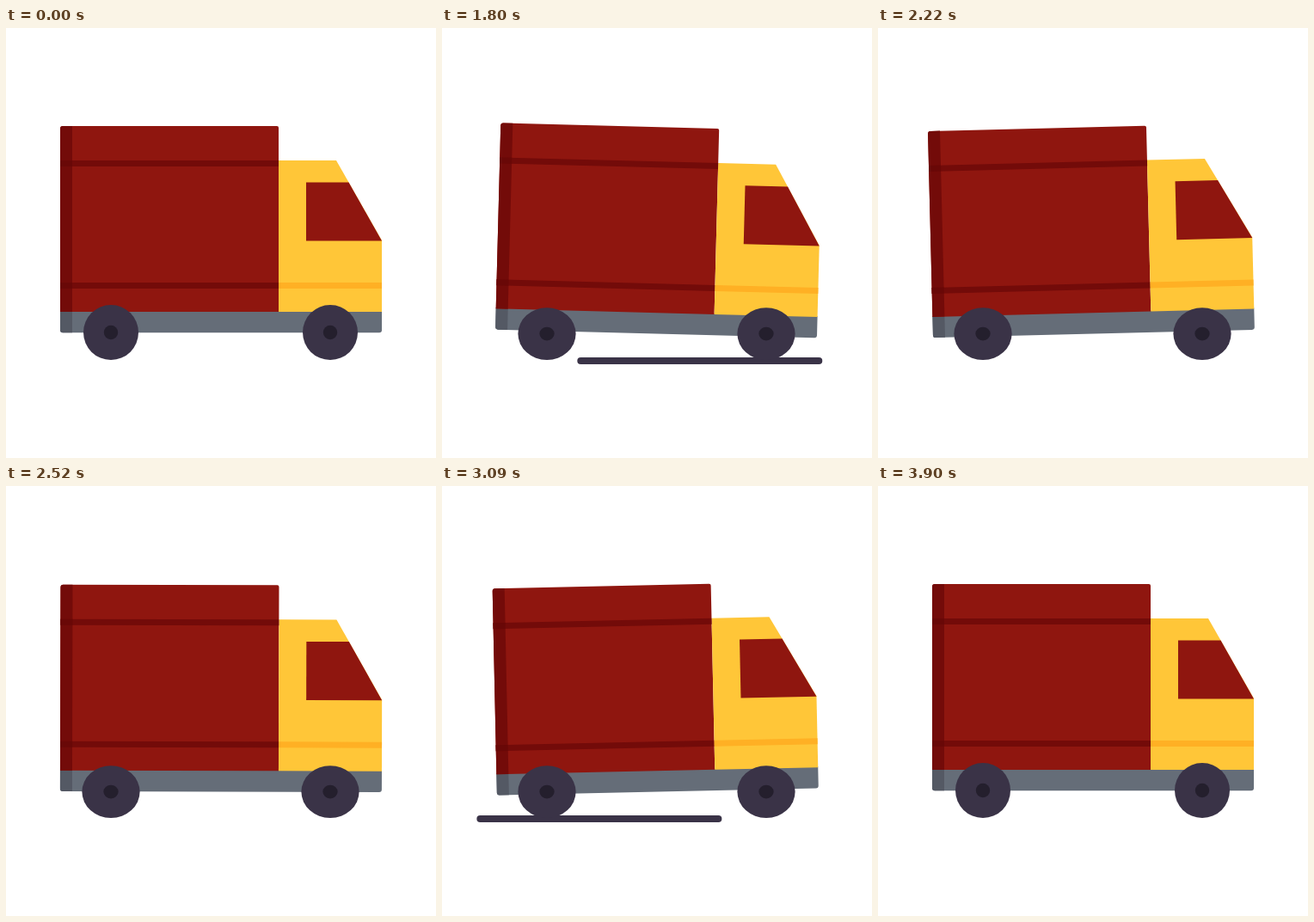
An HTML page with a canvas that plays this animation: 500x500 px, repeating every 3990 ms.

```html
<!DOCTYPE html>
<html lang="en">
<head>
<meta charset="utf-8">
<title>Truck</title>
<style>
  html, body { margin: 0; width: 100%; height: 100%; overflow: hidden; background: #fff; }
  canvas { display: block; width: 100vmin; height: 100vmin; }
</style>
</head>
<body>
<canvas id="stage" width="500" height="500"></canvas>
<script>
const ctx = document.getElementById('stage').getContext('2d');

const LOOP = 3990, STEP = 30;
const DRIVE_START = 1525, DRIVE_END = 3900;
const SWING = (DRIVE_END - DRIVE_START) / 5;
const TILTS = [0, 1, -1, 1, -1, 0];
const MAX_TILT = 1.5 * Math.PI / 180;
const ROAD_START = 1500, ROAD_PERIOD = 1200;

const RED = '#8f160f', DARK_RED = '#730b09', DEEP_RED = '#690807';
const YELLOW = '#ffc638', AMBER = '#ffb024';
const GREY = '#656d78', DARK_GREY = '#545964';
const TYRE = '#3a3347', HUB = '#241f2d';

const easeOut = u => 1 - 2 ** (-12 * u);
const mix = (a, b, u) => a + (b - a) * u;

function rect(x, y, w, h, color) {
  ctx.fillStyle = color;
  ctx.fillRect(x, y, w, h);
}

function rounded(x, y, w, h, radii, color) {
  ctx.fillStyle = color;
  ctx.beginPath();
  ctx.roundRect(x, y, w, h, radii);
  ctx.fill();
}

function polygon(points, color) {
  ctx.fillStyle = color;
  ctx.beginPath();
  points.forEach(([x, y]) => ctx.lineTo(x, y));
  ctx.fill();
}

function disc(r, color) {
  ctx.fillStyle = color;
  ctx.beginPath();
  ctx.arc(0, -32, r, 0, Math.PI * 2);
  ctx.fill();
}

// Tilt swings between extremes; squash holds until the last swing.
function pose(t) {
  if (t < DRIVE_START || t >= DRIVE_END) return { tilt: 0, squash: 0 };
  const phase = (t - DRIVE_START) / SWING;
  const i = Math.floor(phase);
  const u = easeOut(phase - i);
  return {
    tilt: mix(TILTS[i], TILTS[i + 1], u),
    squash: i === 0 ? u : i === 4 ? 1 - u : 1
  };
}

function drawBody({ tilt, squash }) {
  ctx.save();
  ctx.translate(250, 316 + 1.2 * squash);
  ctx.rotate(tilt * MAX_TILT);
  ctx.translate(-250, -316);

  rounded(63, 329, 374, 25.3, [0, 0, 3, 3], GREY);
  rounded(63, 329, 14, 25.3, [0, 0, 0, 3], DARK_GREY);

  rounded(63, 114, 254, 216, [3, 2, 0, 0], RED);
  rounded(63, 114, 14, 216, [3, 0, 0, 0], DARK_RED);

  polygon([[317, 154], [384, 154], [437, 247], [437, 330], [317, 330]], YELLOW);
  polygon([[349, 179.5], [398.5, 179.5], [437, 247.5], [349, 247.5]], RED);

  for (const y of [154, 296]) {
    rect(63, y, 254, 7, DARK_RED);
    rect(63, y, 14, 7, DEEP_RED);
  }
  rect(317, 296, 120, 7, AMBER);
  ctx.restore();
}

function drawWheel(x, squash) {
  ctx.save();
  ctx.translate(x, 386);
  ctx.scale(1 + 0.05 * squash, 1 - 0.05 * squash);
  disc(32, TYRE);
  disc(8.2, HUB);
  ctx.restore();
}

function drawRoad(t) {
  if (t < ROAD_START || t >= DRIVE_END) return;
  const elapsed = (t - ROAD_START) % ROAD_PERIOD;
  const x = 1697 * Math.exp(-0.00113 * elapsed) - 1051.8;
  rounded(x, 383, 285, 8, 4, TYRE);
}

function draw(now) {
  const t = Math.floor((now % LOOP) / STEP) * STEP;
  const state = pose(t);
  rect(0, 0, 500, 500, '#fff');
  drawRoad(t);
  drawBody(state);
  drawWheel(122, state.squash);
  drawWheel(377, state.squash);
}

let start;
function tick(now) {
  start ??= now;
  draw(Math.max(0, now - start));
  requestAnimationFrame(tick);
}
draw(0);
requestAnimationFrame(tick);
</script>
</body>
</html>
```
